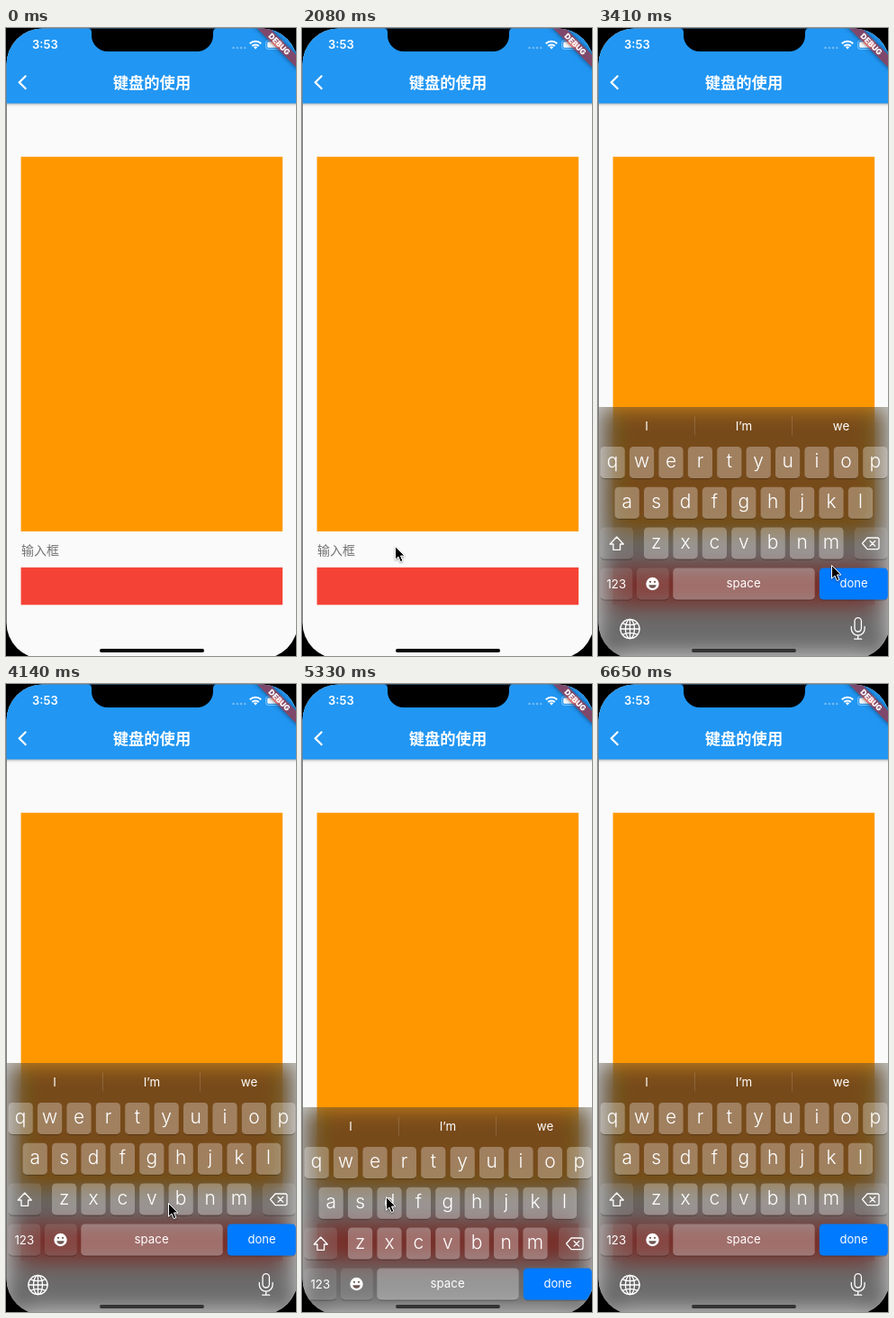
Animation of 322x696 px, one loop 6750 ms. Source, as an HTML page:

```html
<!DOCTYPE html>
<html lang="zh">
<head>
<meta charset="utf-8">
<style>
html, body { margin: 0; width: 100%; height: 100%; overflow: hidden; background: #000; }
div, svg { position: absolute; }
svg { overflow: visible; left: 0; top: 0; font-family: Inter, "Liberation Sans", sans-serif; }
#stage { left: 0; top: 0; width: 100%; height: 100%; overflow: clip; contain: strict; }
#screen { left: 0; top: 0; width: 324px; height: 699px; background: #fafafa; clip-path: inset(.5px 0 0 .5px round 40px); }
#bar { filter: drop-shadow(0 1.5px 1.5px rgba(0,0,0,.35)); }
.cjk { font-family: "Noto Sans CJK SC", "Noto Sans CJK", sans-serif; white-space: nowrap; }
#title { left: 0; width: 324px; top: 48px; text-align: center; font-size: 17.28px; font-weight: 600; line-height: 24px; color: #fff; }
#hint { left: 17px; top: 568px; font-size: 14px; line-height: 20px; color: #737373; }
#banner { left: 269px; top: 13px; width: 69px; height: 10px; transform: rotate(45deg);
  background: rgba(183,28,28,.63); box-shadow: 0 0 5px rgba(0,0,0,.5);
  font: 900 8.6px/10px Inter, sans-serif; text-align: center; color: #fff; }
#kb { left: 0; width: 324px; height: 282px; background: rgba(104,104,104,.25);
  backdrop-filter: blur(13px) brightness(.432) saturate(1.35); }
#home { left: 104px; top: 688px; width: 116px; height: 4px; border-radius: 2px; }
#cursor { filter: drop-shadow(0 1px 1px rgba(0,0,0,.4)); }
</style>
</head>
<body>
<div id="stage">
<div id="screen">
  <svg width="324" height="696">
    <rect x="16.6" y="142.7" width="290.5" height="415.2" fill="#ff9800"/>
    <rect x="16.6" y="597.8" width="290.5" height="41.5" fill="#f44336"/>
    <rect id="bar" width="324" height="83.5" fill="#2196f3"/>
  </svg>
  <div id="hint" class="cjk">输入框</div>
  <div id="title" class="cjk">键盘的使用</div>
  <svg width="324" height="90" fill="#fff">
    <path d="M22.3 52.8 14.8 60.3 22.3 67.8" fill="none" stroke="#fff" stroke-width="2.2"/>
    <text x="29" y="23.4" font-size="13" font-weight="600">3:53</text>
    <g opacity=".35"><circle cx="252.5" cy="22" r="1.3"/><circle cx="256.8" cy="22" r="1.3"/><circle cx="261" cy="22" r="1.3"/><circle cx="265.2" cy="22" r="1.3"/></g>
    <g fill="none" stroke="#fff" stroke-width="2"><path d="M270.7 17.3a9 9 0 0 1 12.6 0M273.2 20a5.4 5.4 0 0 1 7.6 0"/></g>
    <path d="M274.9 21.3a3 3 0 0 1 4.2 0L277 23.6Z"/>
    <rect x="288.6" y="13.6" width="19" height="9.8" rx="2.8" fill="none" stroke="#fff" stroke-opacity=".45"/>
    <rect x="290.2" y="15.2" width="15.8" height="6.6" rx="1.6"/>
  </svg>
  <div id="banner">DEBUG</div>
  <svg width="324" height="30"><path d="M91 0Q95 .5 95 5V8A18 18 0 0 0 113 26H212A18 18 0 0 0 230 8V5Q230 .5 234 0Z"/></svg>
  <div id="kb"><svg id="keys" width="324" height="276" fill="#fff"></svg></div>
  <div id="home"></div>
</div>
<svg id="cursor" width="16" height="22">
  <path d="M.5.5V15.2L3.9 12 6.3 17.6 8.9 16.5 6.5 11H11Z" stroke="#fff"/>
</svg>
</div>
<script>
const $ = id => document.getElementById(id);

const label = (s, x, y, size = 13.3, weight = 400) =>
  `<text x="${x}" y="${y}" font-size="${size}" font-weight="${weight}" text-anchor="middle">${s}</text>`;
const key = (x, y, w, fill) =>
  `<path d="M${x + 1} ${y + 33}q.5 2.6 4 2.6h${w - 10}q3.5 0 4-2.6" fill="none" stroke="#000" stroke-opacity=".28"/>` +
  `<rect x="${x}" y="${y}" width="${w}" height="35" rx="4.3" fill="${fill}"/>`;
const light = 'rgba(255,255,255,.3)', dim = 'rgba(255,255,255,.11)';

let art = label('I', 54, 26) + label('I’m', 162, 26) + label('we', 270, 26) +
  '<path d="M107.5 10.5v21M215.5 10.5v21" stroke="#fff" stroke-opacity=".14"/>';
[['qwertyuiop', 2.6], ['asdfghjkl', 18.6], ['zxcvbnm', 51]].forEach(([row, left], r) => {
  [...row].forEach((c, i) => {
    const x = left + i * 32.4, y = 44 + r * 44.8;
    art += key(x, y, 27.2, light) + label(c, x + 13.6, y + 23, 21, 300);
  });
});
art += key(2.5, 133.6, 36.5, dim) + key(285, 133.6, 36.5, dim) +
  key(2.5, 178.5, 35.8, dim) + key(43, 178.5, 35.8, dim) +
  key(83.3, 178.5, 157.4, light) + key(245.8, 178.5, 76, '#007aff') +
  label('123', 20.3, 200.6) + label('space', 161.6, 199.6) + label('done', 284, 199.6, 13);
// emoji face
art += `<circle cx="60.5" cy="196" r="7.2"/>
  <g fill="#6b5550"><circle cx="58" cy="193.8" r="1.1"/><circle cx="63" cy="193.8" r="1.1"/>
  <path d="M56.3 197.2h8.4q-.8 3.6-4.2 3.6T56.3 197.2Z"/></g>`;
// shift, delete, globe, microphone
art += `<g fill="none" stroke="#fff" stroke-width="1.3" stroke-linejoin="round" stroke-linecap="round">
  <path d="M20.8 144 28.3 152H24.6V158.3H17V152H13.3Z"/>
  <path d="M293.5 151.3 299 145H310Q312 145 312 147V155.6Q312 157.6 310 157.6H299ZM302 148.5l5.6 5.6M307.6 148.5l-5.6 5.6"/>
  <circle cx="35.5" cy="246" r="10.6"/><ellipse cx="35.5" cy="246" rx="5" ry="10.6"/>
  <path d="M35.5 235.4v21.2M24.9 246h21.2M27.4 239.8q8.1 3.6 16.2 0M27.4 252.2q8.1-3.6 16.2 0"/>
  <rect x="285" y="233.6" width="7.4" height="15.4" rx="3.7"/>
  <path d="M281.3 243.5v2.3a7.4 7.4 0 0 0 14.8 0v-2.3M288.7 253.2v4M284.7 257.2h8"/></g>`;
$('keys').innerHTML = art;

const LOOP = 6750, TICK = 147.9, TOP = 420, BOTTOM = 696;

// critically damped spring: share of the way still to go
const rest = ms => {
  const x = Math.max(0, ms) * 0.01826;
  return (1 + x) * Math.exp(-x);
};
const hidden = t =>
  t < 4228 ? rest(t - 2307) :
  t < 5152 ? 1 - rest(t - 4228) : rest(t - 5152);

// pointer path: tick, x, y
const path = [
  [8, 182, 655], [9, 163, 626], [10, 137, 596], [11, 118, 580], [12, 105, 572], [14, 103, 574],
  [20, 103, 574], [21, 140, 574], [22, 212, 582], [23, 259, 595], [24, 278, 608], [25, 281, 611],
  [26, 281, 611], [27, 270, 607], [28, 180, 575], [29, 105, 563], [30, 93, 562], [33, 93, 568],
  [38, 93, 568], [40, 60, 585], [42, 15, 610], [43, 15, 610], [44, 4, 668]
];
function pointer(n) {
  const i = path.findIndex(p => p[0] >= n);
  if (n < path[0][0] || i < 0) return null;
  const b = path[i], a = path[Math.max(0, i - 1)];
  const k = b === a ? 0 : (n - a[0]) / (b[0] - a[0]);
  return [a[1] + (b[1] - a[1]) * k, a[2] + (b[2] - a[2]) * k];
}

function draw() {
  const n = Math.floor((performance.now() % LOOP + 8) / TICK);
  const y = Math.round(TOP + (BOTTOM - TOP) * hidden(n * TICK));
  $('kb').style.top = y + 'px';
  $('kb').style.display = y < BOTTOM ? 'block' : 'none';
  $('home').style.background = y < 690 ? '#333' : '#000';
  const p = pointer(n);
  $('cursor').style.display = p ? 'block' : 'none';
  if (p) $('cursor').style.transform = `translate(${p[0]}px,${p[1]}px)`;
  requestAnimationFrame(draw);
}
draw();
</script>
</body>
</html>
```
